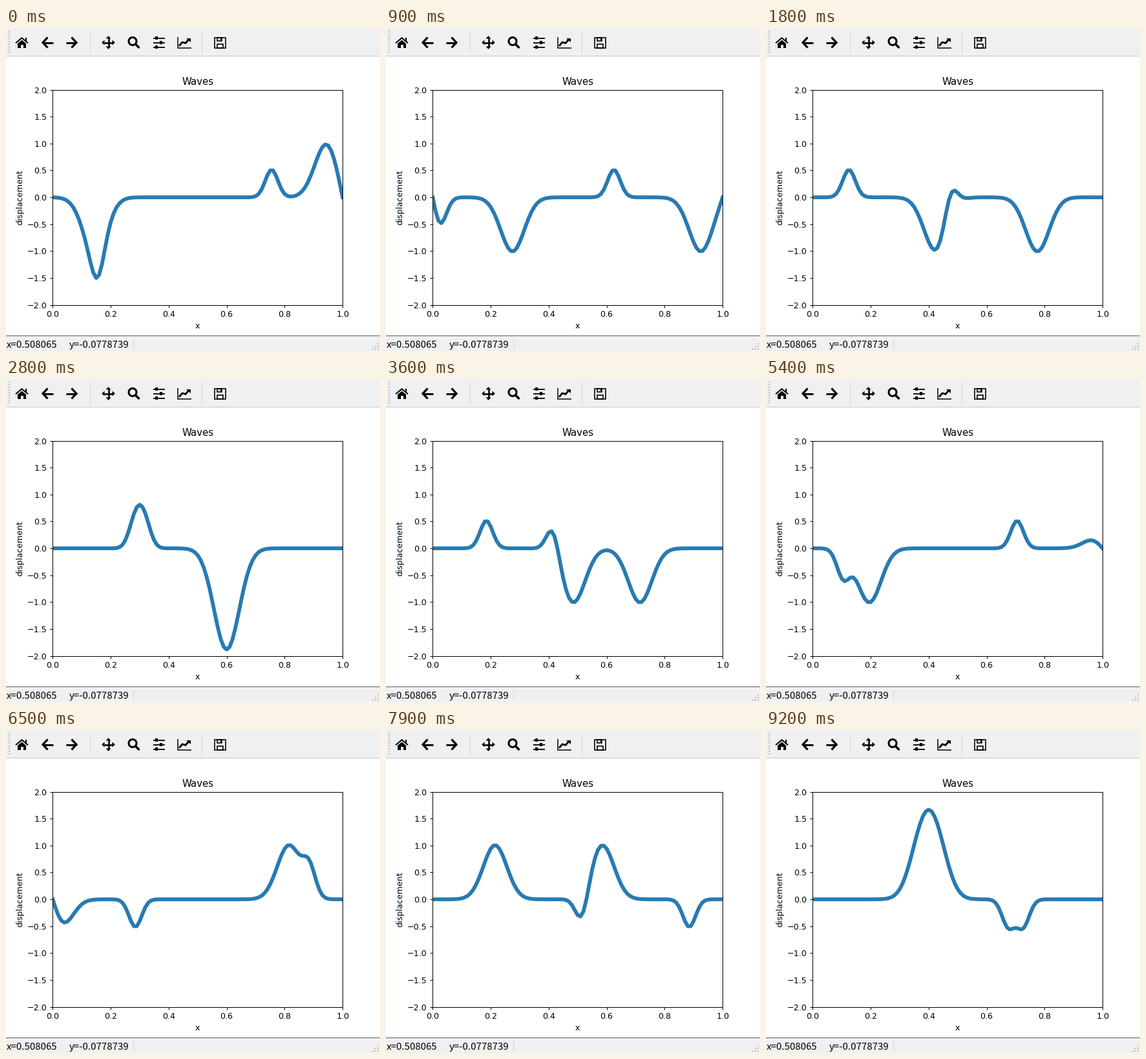
A matplotlib script for the animation above (9300 ms loop, 579 px wide and 500 px high).

```python
import numpy as np
import matplotlib.pyplot as plt
from matplotlib.animation import FuncAnimation
from matplotlib.patches import Circle, Polygon, Rectangle

W, H, DPI = 579, 500, 100
SCALE = W / 640          # the plot window is a default figure, shrunk
PX = 72 / DPI            # points per pixel
CANVAS_TOP, CANVAS_BOTTOM = 43, 477
AXES_TOP, AXES_BOTTOM = 95.6, 428.6
FRAMES, INTERVAL = 93, 100
FIRST_STEP, STEPS_PER_FRAME = 54.5, 1.625
PANEL, FAINT, DOTS = "#f0eff1", "#d2d1d3", "#bab9bb"
MID = 22.5               # centre line of the toolbar
UP, RIGHT, LEFT = -np.pi / 2, 0, np.pi

plt.rcParams["font.family"] = "DejaVu Sans"
plt.rcParams["font.size"] = 10 * SCALE
for key in ("axes.linewidth", "axes.titlepad", "axes.labelpad",
            "xtick.major.size", "xtick.major.width", "xtick.major.pad",
            "ytick.major.size", "ytick.major.width", "ytick.major.pad"):
    plt.rcParams[key] *= SCALE


def simulate(steps):
    """Leapfrog solution of a string with fixed ends, released from rest."""
    x = np.linspace(0, 1, 101)
    u = 2 * np.exp(-300 * (x - 0.4) ** 2) - np.exp(-1000 * (x - 0.7) ** 2)
    u[[0, -1]] = 0
    previous, history = u.copy(), [u]
    for _ in range(steps):
        following = np.zeros_like(u)
        following[1:-1] = u[2:] + u[:-2] - previous[1:-1]
        previous, u = u, following
        history.append(u)
    return x, history


fig = plt.figure(figsize=(W / DPI, H / DPI), dpi=DPI, facecolor="white")
ui = fig.add_axes([0, 0, 1, 1])
ui.set(xlim=(0, W), ylim=(H, 0))
ui.axis("off")


def box(x, y, w, h, color="black"):
    ui.add_patch(Rectangle((x, y), w, h, fc=color, ec="none"))


def outline(x, y, w, h, width=1.6):
    ui.add_patch(Rectangle((x, y), w, h, fc="none", ec="black", lw=width * PX))


def stroke(points, width, cap="butt"):
    ui.plot(*zip(*points), color="black", lw=width * PX,
            solid_capstyle=cap, solid_joinstyle="miter")


def fill(points):
    ui.add_patch(Polygon(points, fc="black", ec="none"))


def wedge(x, y, angle, depth, spread):
    """Three points of an arrowhead whose tip is at (x, y)."""
    ahead = np.array([np.cos(angle), np.sin(angle)])
    side = np.array([-ahead[1], ahead[0]])
    tip = np.array([x, y])
    back = tip - depth * ahead
    return [back + spread * side, tip, back - spread * side]


def home(x):
    stroke(wedge(x, 15.3, UP, 8, 9.5), 2)
    fill(wedge(x, 18.6, UP, 5.4, 6.5))
    box(x - 6.5, 24, 13, 7)
    box(x - 2, 26, 4, 5, PANEL)
    box(x + 5, 15, 2.5, 5)


def arrow(x, angle):
    sign = np.cos(angle)
    stroke([(x - 9.5 * sign, MID), (x + 6.5 * sign, MID)], 3)
    stroke(wedge(x + 6.5 * sign, MID, angle, 7.5, 8), 3.2)


def back(x):
    arrow(x, LEFT)


def forward(x):
    arrow(x, RIGHT)


def move(x):
    for angle in np.arange(4) * np.pi / 2:
        dx, dy = np.cos(angle), np.sin(angle)
        stroke([(x, MID), (x + 7 * dx, MID + 7 * dy)], 2.6)
        fill(wedge(x + 10.3 * dx, MID + 10.3 * dy, angle, 4.3, 4))


def zoom(x):
    ui.add_patch(Circle((x - 1.5, MID - 2), 6, fc="none", ec="black",
                        lw=3 * PX))
    stroke([(x + 3, MID + 2.5), (x + 8, MID + 7.5)], 3.5, "round")


def sliders(x):
    for row in range(3):
        y = MID + 7 * (row - 1)
        knob = x + 7 * (row % 2) - 3.5
        stroke([(x - 9, y), (x + 9, y)], 1.8)
        box(knob - 3, y - 2.5, 6, 5, PANEL)
        box(knob - 2, y - 2.5, 4, 5)


def chart(x):
    stroke([(x - 10, 14), (x - 10, 31), (x + 11, 31)], 1.5)
    i = np.arange(4)
    zigzag = 26 - 2.2 * i + 1.8 * (-1.0) ** i
    stroke(list(zip(x - 7.5 + 5 * i, zigzag)), 2.8)
    fill(wedge(x + 10.2, 15.8, -np.pi / 4, 4.4, 4.4))


def save(x):
    outline(x - 8.2, 14.5, 16.4, 16.2)
    outline(x - 4.7, 14.5, 7.5, 5.5)
    outline(x - 4.7, 25, 9.4, 5.7)
    box(x, 15, 2, 4)


def draw_toolbar():
    box(0, 0, W, CANVAS_TOP, PANEL)
    box(0, CANVAS_TOP, W, 1, "#c8c7c9")
    for y in range(4, 40, 4):
        box(4, y, 2, 2, DOTS)
    x = 24.5
    for group in ((home, back, forward), (move, zoom, sliders, chart),
                  (save,)):
        for icon in group:
            icon(x)
            x += 39
        if icon is not save:
            box(round(x - 11.5), 5, 1, 34, FAINT)
        x += 17


def draw_status():
    box(0, CANVAS_BOTTOM - 1, W, H - CANVAS_BOTTOM + 1, PANEL)
    box(0, CANVAS_BOTTOM - 1, W, 1, "#606060")
    box(197, 481, 1, 17, FAINT)
    for x, label in ((1, "x=0.508065"), (97.5, "y=-0.0778739")):
        ui.text(x, 495, label, family="Noto Sans CJK JP", size=10.8)
    for row in range(3):
        for col in range(row + 1):
            box(575 - 4 * col, 488 + 4 * row, 2, 2, DOTS)


draw_toolbar()
draw_status()

ax = fig.add_axes([0.125, 1 - AXES_BOTTOM / H,
                   0.775, (AXES_BOTTOM - AXES_TOP) / H])
ax.set(xlim=(0, 1), ylim=(-2, 2), title="Waves", xlabel="x",
       ylabel="displacement")

x, history = simulate(int(FIRST_STEP + STEPS_PER_FRAME * FRAMES))
wave, = ax.plot(x, history[0], color="#297ab1", lw=4.2)


def update(frame):
    # The opening pose is held for two ticks.
    step = int(FIRST_STEP + STEPS_PER_FRAME * max(frame - 1, 0))
    wave.set_ydata(history[step])
    return wave,


anim = FuncAnimation(fig, update, frames=FRAMES, interval=INTERVAL,
                     repeat=True, repeat_delay=0)
plt.show()
```
